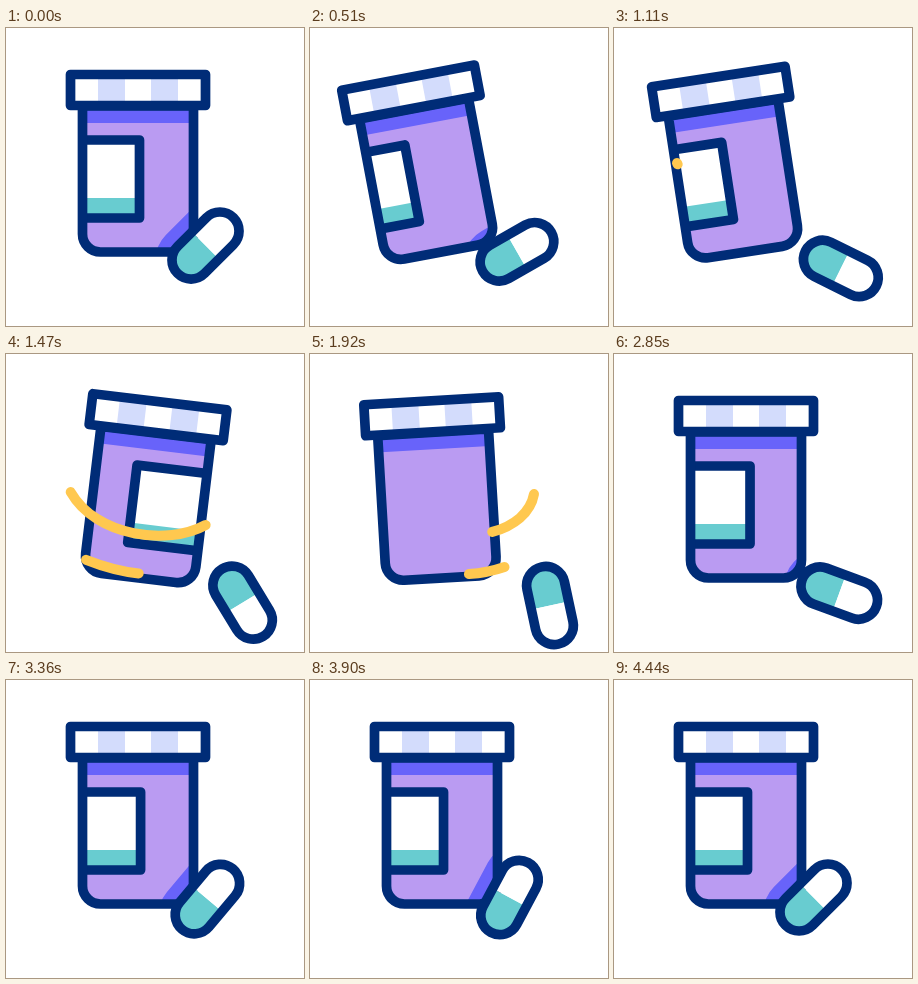
An HTML page that plays this animation: 298x298 px, repeating every 5400 ms.

```html
<!DOCTYPE html>
<html lang="en">
<head>
<meta charset="utf-8">
<title>Pill bottle</title>
<style>
html, body { margin: 0; width: 100%; height: 100%; overflow: hidden; background: #fff; }
svg { display: block; width: 100%; height: 100%; }
.line { fill: none; stroke: #002c77; stroke-width: 9.7; stroke-linejoin: round; }
.swoosh { fill: none; stroke: #ffc84f; stroke-width: 10; stroke-linecap: round; }
</style>
</head>
<body>
<svg viewBox="0 0 298 298">
  <defs>
    <path id="body" d="M76.5 78V206a18 18 0 0 0 18 18H169.5a18 18 0 0 0 18-18V78z"/>
    <clipPath id="inside"><use href="#body"/></clipPath>
    <clipPath id="capsule"><rect x="-36" y="-15.5" width="72" height="31" rx="15.5"/></clipPath>
  </defs>

  <g id="bottle">
    <g clip-path="url(#inside)">
      <rect x="72" y="78" width="120" height="150" fill="#ba9bf2"/>
      <rect x="72" y="78" width="120" height="17" fill="#6863fa"/>
      <g id="level">
        <path id="shadow" d="M-20.6 0H20.6" stroke="#6863fa" stroke-width="71" stroke-linecap="round"/>
      </g>
      <g id="label">
        <rect x="54" y="112" width="79.5" height="78" fill="#fff"/>
        <rect x="54" y="170" width="79.5" height="20" fill="#68ccd0"/>
        <rect x="54" y="112" width="79.5" height="78" class="line"/>
      </g>
    </g>
    <use href="#body" class="line"/>
    <rect x="64.5" y="46.5" width="135" height="31" fill="#fff"/>
    <path d="M92 47h27v30h-27zM145 47h27v30h-27z" fill="#d3dcfc"/>
    <rect x="64.5" y="46.5" width="135" height="31" class="line"/>
  </g>

  <path class="swoosh" pathLength="1" d="M63 135C95 198 214 195 224 140"/>
  <path class="swoosh" pathLength="1" d="M78 205Q142 231 194.5 213"/>

  <g id="pill">
    <g clip-path="url(#capsule)">
      <rect x="-40" y="-20" width="40" height="40" fill="#68ccd0"/>
      <rect y="-20" width="40" height="40" fill="#fff"/>
    </g>
    <rect x="-39.5" y="-19.1" width="79" height="38.2" rx="19.1" class="line"/>
  </g>
</svg>
<script>
const LOOP = 5400;
const $ = id => document.getElementById(id);
const swooshes = document.querySelectorAll('.swoosh');

const sine = x => (1 - Math.cos(Math.PI * x)) / 2;
const quad = x => x < .5 ? 2 * x * x : 1 - 2 * (1 - x) ** 2;
const cubic = x => x < .5 ? 4 * x ** 3 : 1 - 4 * (1 - x) ** 3;
const part = (t, from, to) => Math.min(1, Math.max(0, (t - from) / (to - from)));

// keys: [time, value, easing towards this key]
function track(t, keys) {
  let value = keys[0][1];
  for (let i = 1; i < keys.length; i++) {
    const [from, a] = keys[i - 1], [to, b, ease = sine] = keys[i];
    if (t >= from) value = a + (b - a) * ease(part(t, from, to));
  }
  return value;
}

const TILT = [[0, 0], [860, -16.6], [1500, 7], [1950, -3.5], [2400, 2.5], [2820, 0]];
const TURN = 240;
const SPIN = [[0, 0], [845, -26], [2450, TURN + 3], [4000, TURN]];
const PILL_ANGLE = [[0, -45], [2060, 79, quad], [2200, 79], [3680, -66], [4440, -45]];
const PILL_SHIFT = [[0, 0], [1810, 1], [2140, 1], [3720, 0, cubic]];

function draw(t) {
  const tilt = track(t, TILT);
  const spin = track(t, SPIN);
  const shift = track(t, PILL_SHIFT);
  const place = `translate(${199.5 + 40.5 * shift} ${217.5 + 34 * shift}) rotate(${track(t, PILL_ANGLE)})`;
  const set = (id, transform) => $(id).setAttribute('transform', transform);

  set('bottle', `rotate(${tilt} 132 229)`);
  set('level', `rotate(${-tilt} 132 229)`);
  set('label', `translate(${spin > 145 ? spin - TURN : spin} 0)`);
  set('shadow', place);
  set('pill', place);

  swooshes.forEach((path, i) => {
    const head = sine(part(t, 1080 + 120 * i, 1640 + 120 * i));
    const tail = sine(part(t, 1400, 2230));
    path.style.display = head > tail ? '' : 'none';
    path.style.strokeDasharray = `${Math.max(.001, head - tail)} 3`;
    path.style.strokeDashoffset = -tail;
  });
}

const start = performance.now();
function tick() {
  draw((performance.now() - start) % LOOP);
  requestAnimationFrame(tick);
}
tick();
</script>
</body>
</html>
```
